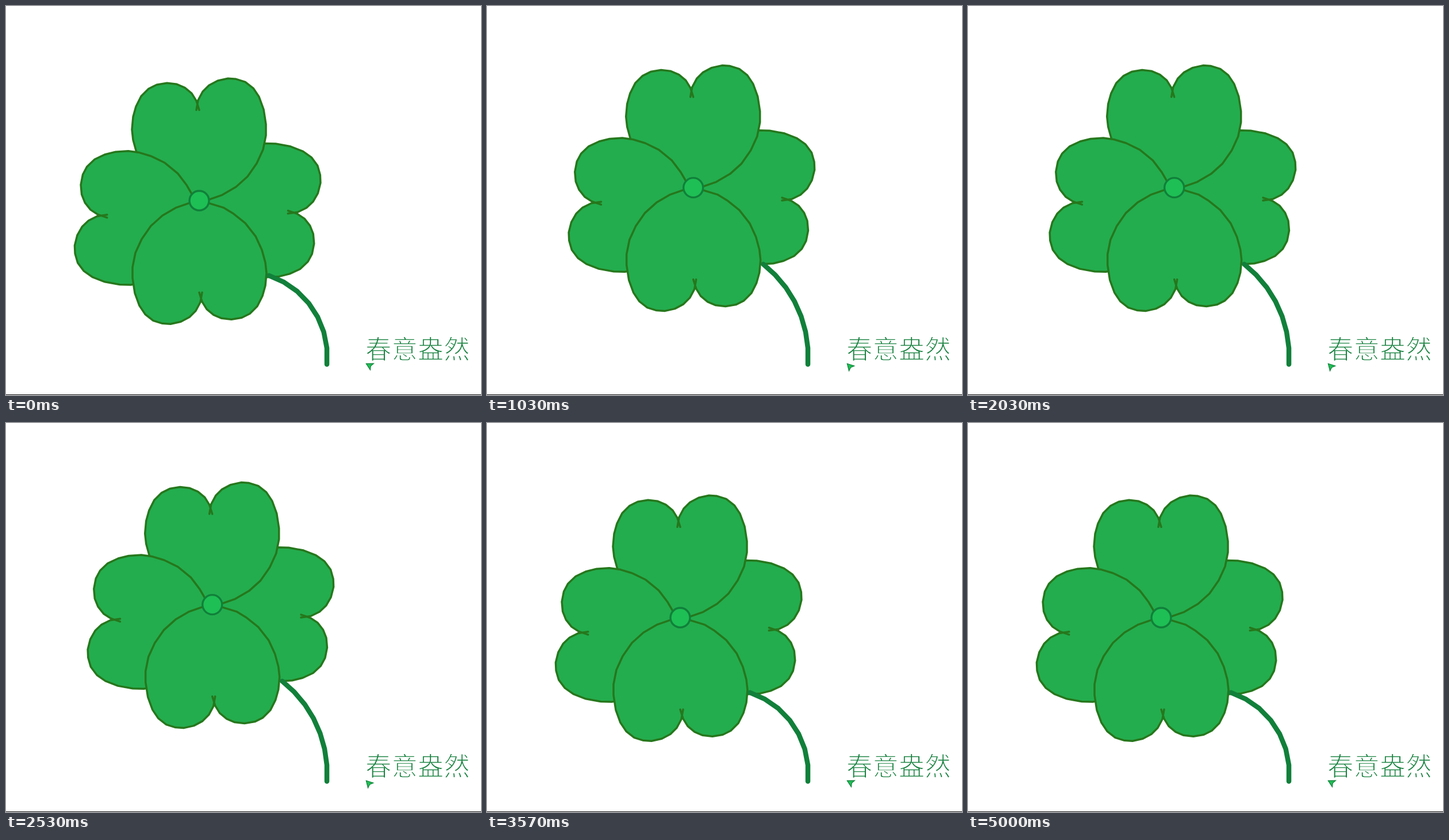
These frames come from a looping animation (826 by 678 pixels, 5.03 s). An HTML page:

```html
<!DOCTYPE html>
<html lang="zh">
<head>
<meta charset="utf-8">
<title>春意盎然</title>
<style>
  html, body { margin: 0; width: 100%; height: 100%; overflow: hidden; background: #fff; }
  svg { display: block; width: 826px; height: 678px; }
  .leaf { fill: #23ad4f; stroke: #26771c; stroke-width: 3.5; stroke-linejoin: round; stroke-linecap: round; }
  .heart { fill: #1ebf54; stroke: #11803a; stroke-width: 3.4; }
  .stem { fill: none; stroke: #11803a; stroke-width: 8.5; stroke-linejoin: round; stroke-linecap: round; }
  .cursor { fill: #1ebf54; stroke: #11803a; stroke-width: 1.2; }
  /* The white stroke thins the glyphs. */
  text { font: 300 45.4px "Noto Sans CJK SC", "Noto Sans CJK", sans-serif; fill: #1c8443; stroke: #fff; stroke-width: 1.5; }
</style>
</head>
<body>
<svg viewBox="0 0 826 678">
  <defs>
    <path id="petal" class="leaf" d="M0-158L-5-174-13-187-25-197-39-203-56-205-74-202-88-195-101-182-110-164-115-146-117-124-115-106-109-84-98-60-80-37-60-21-42-10-19-3 0 0 17-2 40-10 64-24 84-42 100-65 111-89 116-114 116-133 112-159 104-181 94-196 80-207 64-212 50-213 32-209 17-201 6-190-2-175-5-158"/>
  </defs>
  <g id="flower">
    <use href="#petal" transform="matrix(.03 -1 -1 -.03 -3.6 12.7)"/>
    <use href="#petal"/>
    <use href="#petal" transform="matrix(-.025 1 1 .025 -2.3 33.5)"/>
    <use href="#petal" transform="matrix(-1 0 0 -1 0 2)"/>
    <circle class="heart" r="17"/>
  </g>
  <path id="stem" class="stem"/>
  <text x="625" y="615">春意盎然</text>
  <path id="cursor" class="cursor" d="M0 0L11.4 6.3 9 0 11.4-6.3Z"/>
  <rect y="677" width="826" height="1" fill="#111"/>
</svg>
<script>
  const LOOP = 5030, TICK = 100 / 3;
  const poses = [
    { x: 336, y: 339.3, turn: 28, stem: stemPath(11) },
    { x: 358.7, y: 316.6, turn: 47, stem: stemPath(8) }
  ];
  const part = id => document.getElementById(id);
  const flower = part('flower'), stem = part('stem'), cursor = part('cursor');
  let shown = -1;

  // Seven equal strokes, each turned left by the same angle.
  function stemPath(bend) {
    let x = 558, y = 624.5, d = `M${x} ${y}`;
    for (let i = 0; i < 7; i++) {
      const a = i * bend * Math.PI / 180;
      x -= 28.4 * Math.sin(a);
      y -= 28.4 * Math.cos(a);
      d += `L${x.toFixed(1)} ${y.toFixed(1)}`;
    }
    return d;
  }

  function show(i) {
    if (i === shown) return;
    shown = i;
    const p = poses[i];
    flower.setAttribute('transform', `translate(${p.x} ${p.y})`);
    stem.setAttribute('d', p.stem);
    cursor.setAttribute('transform', `translate(626.3 623.3) rotate(${p.turn})`);
  }

  // The clover flips between two poses 14 times in every 15 ticks.
  function poseAt(ms) {
    const tick = Math.floor((ms % LOOP + 4) / TICK);
    return Math.floor(tick * 14 / 15 + 0.5) % 2;
  }

  const start = performance.now();
  function frame() {
    show(poseAt(performance.now() - start));
    requestAnimationFrame(frame);
  }
  frame();
</script>
</body>
</html>
```
